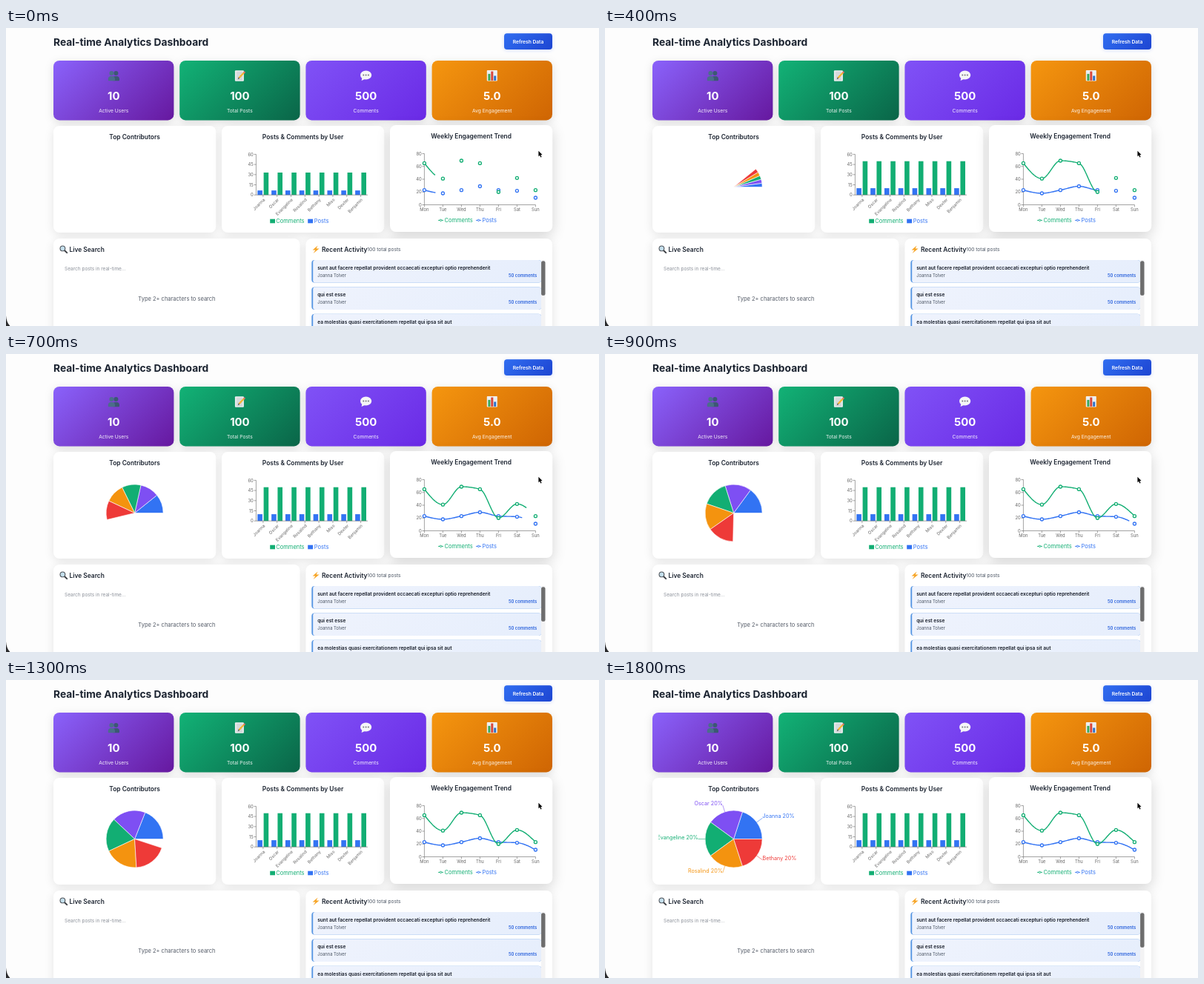
Write an HTML page with a canvas that moves like this. It is 800 by 402 pixels and loops after 2 s.

```html
<!DOCTYPE html>
<html lang="en">
<head>
<meta charset="utf-8">
<title>Analytics Dashboard</title>
<style>
  html, body { margin: 0; width: 100%; height: 100%; overflow: hidden; background: #fdfdfd; }
  canvas { display: block; width: 800px; height: 402px; }
</style>
</head>
<body>
<canvas id="stage" width="800" height="402"></canvas>
<script>
const ctx = document.getElementById('stage').getContext('2d');
const LOOP = 2000, STEP = 100, LAST = 1800;
const BLUE = '#3273f3', PURPLE = '#7e4ff3', GREEN = '#12ae73', ORANGE = '#f4930f', RED = '#ee3a38';
const INK = '#1c2431', AXIS = '#666';
const PEOPLE = ['Joanna', 'Oscar', 'Evangeline', 'Rosalind', 'Bethany', 'Miss', 'Dexter', 'Benjamin'];
const AUTHOR = 'Joanna Tolver';
const DAYS = ['Mon', 'Tue', 'Wed', 'Thu', 'Fri', 'Sat', 'Sun'];
const POSTS = [23, 18, 23, 29, 23, 22, 11];
const COMMENTS = [65, 41, 69, 65, 20, 42, 23];

// CSS "ease" curve
function ease(x) {
  if (x <= 0) return 0;
  if (x >= 1) return 1;
  const bezier = (s, a, b) => 3 * (1 - s) * (1 - s) * s * a + 3 * (1 - s) * s * s * b + s ** 3;
  let low = 0, high = 1;
  for (let i = 0; i < 24; i++) {
    const mid = (low + high) / 2;
    if (bezier(mid, .25, .25) < x) low = mid; else high = mid;
  }
  return bezier(low, .1, 1);
}

// y is the middle of the capital letters
function text(str, x, y, size, color, { weight = 400, align = 'left' } = {}) {
  ctx.font = `${weight} ${size}px Inter, sans-serif`;
  ctx.textAlign = align;
  ctx.fillStyle = color;
  ctx.fillText(str, x, y + size * .364);
}

function box(x, y, w, h, r, fill, shadow) {
  ctx.save();
  if (shadow) {
    ctx.shadowColor = shadow.color;
    ctx.shadowBlur = shadow.blur;
    ctx.shadowOffsetY = shadow.y;
  }
  ctx.fillStyle = fill;
  ctx.beginPath();
  ctx.roundRect(x, y, w, h, r);
  ctx.fill();
  ctx.restore();
}

function disc(x, y, r, fill) {
  ctx.fillStyle = fill;
  ctx.beginPath();
  ctx.arc(x, y, r, 0, 2 * Math.PI);
  ctx.fill();
}

function poly(points, fill) {
  ctx.fillStyle = fill;
  ctx.beginPath();
  points.forEach(p => ctx.lineTo(...p));
  ctx.closePath();
  ctx.fill();
}

function line(points, color, width) {
  ctx.strokeStyle = color;
  ctx.lineWidth = width;
  ctx.beginPath();
  points.forEach(p => ctx.lineTo(...p));
  ctx.stroke();
}

function diagonal(x, y, w, h, from, to) {
  const cx = x + w / 2, cy = y + h / 2, d = (w + h) / 4;
  const g = ctx.createLinearGradient(cx - d, cy - d, cx + d, cy + d);
  g.addColorStop(0, from);
  g.addColorStop(1, to);
  return g;
}

const icons = {
  people(x, y) {
    for (const [dx, color] of [[3.2, '#3c5874'], [-2.8, '#4b6d8b']]) {
      disc(x + dx, y - 3.2, 3, color);
      box(x + dx - 4.6, y + .6, 9.2, 6.4, [4, 4, 1, 1], color);
    }
  },
  memo(x, y) {
    box(x - 6.5, y - 7, 12, 14.5, 1, '#eceef0');
    for (let i = 0; i < 6; i++) line([[x - 4.8, y - 4.6 + i * 2], [x + 3.8, y - 4.6 + i * 2]], '#a3a8ae', .6);
    line([[x - 1, y + 3], [x + 5.6, y - 4]], '#f3b52f', 2.2);
    line([[x + 5.2, y - 3.6], [x + 6.9, y - 5.4]], '#e0736a', 2.2);
    poly([[x - 2.4, y + 4.6], [x - 1.9, y + 2.2], [x - .1, y + 3.8]], '#4a4a4a');
  },
  bubble(x, y) {
    ctx.fillStyle = '#f5f5f7';
    ctx.beginPath();
    ctx.ellipse(x, y - .8, 7.6, 6.1, 0, 0, 2 * Math.PI);
    ctx.fill();
    poly([[x - 5, y + 2], [x - 1, y + 4.5], [x - 6, y + 6.8]], '#f5f5f7');
    for (const dx of [-3.3, 0, 3.3]) disc(x + dx, y - .8, 1, '#77777c');
  },
  bars(x, y) {
    box(x - 7, y - 7.3, 14, 14.6, .8, '#f1f3f5');
    for (let i = -2; i < 3; i++) line([[x - 7, y + i * 2.5], [x + 7, y + i * 2.5]], '#c9d4dd', .4);
    [[-5.4, 9, '#39a85a'], [-1.5, 12.4, '#d8463b'], [2.4, 6.4, '#2e73c9']].forEach(([dx, h, color]) =>
      box(x + dx, y + 6.6 - h, 3, h, 0, color));
  },
  lens(x, y) {
    ctx.lineCap = 'round';
    line([[x + 1.6, y + 1.6], [x + 4.6, y + 4.5]], '#3d4045', 2);
    ctx.lineCap = 'butt';
    disc(x - 1.2, y - 1.2, 3.9, '#50555b');
    disc(x - 1.2, y - 1.2, 2.8, '#c4dfec');
  },
  bolt(x, y) {
    poly([[x + 2.6, y - 5.2], [x - 4.4, y + .9], [x - .6, y + .9], [x - 3.4, y + 5.4],
      [x + 4.6, y - 1.1], [x + .6, y - 1.1]], '#f7a526');
  }
};

function drawHeader() {
  text('Real-time Analytics Dashboard', 64, 18.5, 13.8, INK, { weight: 700 });
  box(672, 7.3, 65, 21.6, 4, diagonal(672, 7.3, 65, 21.6, '#306df0', '#1d45d2'),
    { color: 'rgba(40,90,230,.22)', blur: 5, y: 1 });
  text('Refresh Data', 704.5, 18.4, 6.7, '#fff', { weight: 600, align: 'center' });
}

function drawStats() {
  const stats = [
    ['10', 'Active Users', 'people', '#8a62fb', '#66189f'],
    ['100', 'Total Posts', 'memo', '#12b276', '#0a6548'],
    ['500', 'Comments', 'bubble', '#8052f6', '#6a2ae6'],
    ['5.0', 'Avg Engagement', 'bars', '#f5960f', '#cf6503']
  ];
  stats.forEach(([value, label, icon, from, to], i) => {
    const x = 64 + i * 170.2, mid = x + 81.2;
    box(x, 44, 162.4, 80.4, 8, diagonal(x, 44, 162.4, 80.4, from, to),
      { color: 'rgba(0,0,0,.13)', blur: 12, y: 3 });
    icons[icon](mid, 64.3);
    text(value, mid, 91.4, 14.9, '#fff', { weight: 700, align: 'center' });
    text(label, mid, 111.5, 6.7, 'rgba(255,255,255,.92)', { align: 'center' });
  });
}

function drawCards() {
  const soft = { color: 'rgba(0,0,0,.1)', blur: 13, y: 3 };
  const lifted = { color: 'rgba(0,0,0,.17)', blur: 18, y: 5 };
  const titles = ['Top Contributors', 'Posts & Comments by User', 'Weekly Engagement Trend'];
  titles.forEach((title, i) => {
    const hover = i === 2, y = hover ? 131 : 132, x = 64 + i * 227;
    box(x, y, 219.3, 144, 8, '#fff', hover ? lifted : soft);
    text(title, x + 109.6, y + 15, 8.4, INK, { weight: 600, align: 'center' });
  });
  box(64, 284, 332.6, 140, 8, '#fff', soft);
  box(404.4, 284, 332.6, 140, 8, '#fff', soft);
}

function pieSlice(cx, cy, r, from, to, color) {
  ctx.beginPath();
  ctx.moveTo(cx, cy);
  ctx.arc(cx, cy, r, -from, -to, true);
  ctx.closePath();
  ctx.fillStyle = color;
  ctx.fill();
  ctx.strokeStyle = '#fff';
  ctx.lineWidth = .6;
  ctx.lineJoin = 'round';
  ctx.stroke();
}

function drawPie(time) {
  const cx = 173.6, cy = 214.5, r = 38.5;
  const colors = [BLUE, PURPLE, GREEN, ORANGE, RED];
  const share = ease((time - 400) / 1500) * 2 * Math.PI / colors.length;
  if (!share) return;
  colors.forEach((color, i) => pieSlice(cx, cy, r, i * share, (i + 1) * share, color));
  if (time < 1900) return;
  ctx.save();
  ctx.beginPath();
  ctx.rect(72, 155, 203, 115);
  ctx.clip();
  colors.forEach((color, i) => {
    const a = (i + .5) * share, cos = Math.cos(a), sin = Math.sin(a), end = r + 9.6;
    const x = cx + end * cos, y = cy - end * sin;
    line([[cx + r * cos, cy - r * sin], [x, y]], color, .6);
    text(`${PEOPLE[i]} 20%`, x, y - 2.6, 7.2, color, { align: cos > 0 ? 'left' : 'right' });
  });
  ctx.restore();
}

function drawAxes(x, top, bottom, right, step) {
  line([[x, top], [x, bottom], [right, bottom]], AXIS, .6);
  for (let i = 0; i < 5; i++) {
    const y = bottom - (bottom - top) * i / 4;
    line([[x - 2.9, y], [x, y]], AXIS, .6);
    text(String(i * step), x - 3.7, y, 5.8, AXIS, { align: 'right' });
  }
}

function drawBars(time) {
  const left = 337.4, base = 225.2, band = 18.83, unit = .91;
  const grow = ease(time / 400);
  PEOPLE.forEach((name, i) => {
    const x = left + i * band, mid = x + band / 2;
    box(x + 1.9, base - 10 * unit * grow, 6.6, 10 * unit * grow, 0, BLUE);
    box(x + 10.2, base - 50 * unit * grow, 6.6, 50 * unit * grow, 0, GREEN);
    line([[mid, base], [mid, base + 2.9]], AXIS, .6);
    ctx.save();
    ctx.translate(mid, base + 4);
    ctx.rotate(-Math.PI / 4);
    text(name, 0, 2, 5.8, AXIS, { align: 'right' });
    ctx.restore();
  });
  drawAxes(left, 170.4, base, left + 8 * band, 15);
  box(356.2, 257.7, 6.8, 5.6, 0, GREEN);
  text('Comments', 364.3, 260.2, 7.5, GREEN);
  box(407.2, 257.7, 6.8, 5.6, 0, BLUE);
  text('Posts', 415.8, 260.2, 7.5, BLUE);
}

// Monotone cubic through evenly spaced points, as a fine polyline
function smooth(points) {
  const h = points[1][0] - points[0][0], n = points.length - 1;
  const slope = points.slice(1).map((p, i) => (p[1] - points[i][1]) / h);
  const tangent = points.map((_, i) => {
    if (i === 0 || i === n) return 0;
    const a = slope[i - 1], b = slope[i];
    return (Math.sign(a) + Math.sign(b)) * Math.min(Math.abs(a), Math.abs(b), Math.abs(a + b) / 4);
  });
  tangent[0] = (3 * slope[0] - tangent[1]) / 2;
  tangent[n] = (3 * slope[n - 1] - tangent[n - 1]) / 2;
  const path = [points[0]];
  for (let i = 0; i < n; i++) {
    for (let k = 1; k <= 24; k++) {
      const u = k / 24, v = 1 - u;
      path.push([points[i][0] + u * h,
        points[i][1] * v * v * (1 + 2 * u) + points[i + 1][1] * u * u * (3 - 2 * u)
        + h * u * v * (v * tangent[i] - u * tangent[i + 1])]);
    }
  }
  return path;
}

function drawSeries(values, color, part) {
  const points = values.map((v, i) => [564.4 + i * 25, 238.5 - v * .8625]);
  const path = smooth(points);
  const gap = i => Math.hypot(path[i][0] - path[i - 1][0], path[i][1] - path[i - 1][1]);
  let total = 0;
  for (let i = 1; i < path.length; i++) total += gap(i);
  ctx.save();
  ctx.setLineDash([total * Math.min(1, part) + (part >= 1 ? 1 : 0), total]);
  line(path, color, 1.4);
  ctx.restore();
  points.forEach(p => ring(...p, 2, color, 1.3));
}

function ring(x, y, r, color, width) {
  disc(x, y, r, '#fff');
  ctx.strokeStyle = color;
  ctx.lineWidth = width;
  ctx.stroke();
}

function drawTrend(time) {
  drawAxes(564.4, 169.5, 238.5, 714.4, 20);
  DAYS.forEach((day, i) => {
    const x = 564.4 + i * 25;
    line([[x, 238.5], [x, 241.4]], AXIS, .6);
    text(day, x, 244.7, 5.8, AXIS, { align: 'center' });
  });
  const part = ease(time / 1500);
  drawSeries(POSTS, BLUE, part);
  drawSeries(COMMENTS, GREEN, part * 1.055);
  [['Comments', 583, GREEN], ['Posts', 634, BLUE]].forEach(([label, x, color]) => {
    line([[x, 259.4], [x + 7, 259.4]], color, .9);
    ring(x + 3.5, 259.4, 1.2, color, .9);
    text(label, x + 8.4, 259.2, 7.5, color);
  });
}

function drawSearch() {
  icons.lens(77.6, 298.6);
  text('Live Search', 85.6, 298.6, 8.4, INK, { weight: 600 });
  text('Search posts in real-time...', 79, 324.6, 6.5, '#8b9099');
  text('Type 2+ characters to search', 230.4, 365.2, 7.5, '#555c68', { align: 'center' });
}

function drawActivity() {
  icons.bolt(418, 298.6);
  text('Recent Activity', 426, 298.6, 8.4, INK, { weight: 600 });
  text('100 total posts', 487.3, 298.6, 6.6, '#4b5563');
  const posts = [
    'sunt aut facere repellat provident occaecati excepturi optio reprehenderit',
    'qui est esse',
    'ea molestias quasi exercitationem repellat qui ipsa sit aut'
  ];
  posts.forEach((title, i) => {
    const y = 313 + i * 36.4;
    box(412.3, y, 309.9, 30.6, 4, '#5896e3');
    box(414.2, y, 308, 30.6, [3, 4, 4, 3], diagonal(414, y, 308, 30.6, '#eff3fd', '#e6eefc'));
    text(title, 420.2, y + 10.4, 6.6, '#141a25', { weight: 600 });
    text(AUTHOR, 420.2, y + 20.8, 5.8, '#4b5563');
    text('50 comments', 716.3, y + 20.8, 5.8, '#2a62dc', { weight: 600, align: 'right' });
  });
  box(722, 313, 5.6, 100, 0, '#f3f3f4');
  box(722.1, 314.2, 5.4, 46.6, 2.6, '#6d6d6d');
}

function drawCursor() {
  const x = 718.4, y = 165.8;
  const shape = [[0, 0], [0, 7.4], [1.7, 5.9], [2.9, 8.7], [4.2, 8.1], [3, 5.4], [5.1, 5.2]]
    .map(([dx, dy]) => [x + dx, y + dy]);
  line([...shape, shape[0]], '#fff', 1.2);
  poly(shape, '#050505');
}

// Rounded lower corner of the window
function drawCorner() {
  ctx.fillStyle = '#2b2b2d';
  ctx.beginPath();
  ctx.moveTo(0, 388);
  ctx.quadraticCurveTo(.6, 397.5, 5.5, 402);
  ctx.lineTo(0, 402);
  ctx.fill();
}

function render(t) {
  const time = 155 + 1.02 * t;
  ctx.fillStyle = '#fdfdfd';
  ctx.fillRect(0, 0, 800, 402);
  drawHeader();
  drawStats();
  drawCards();
  drawPie(time);
  drawBars(time);
  drawTrend(time);
  drawSearch();
  drawActivity();
  drawCursor();
  drawCorner();
}

const start = performance.now();
let shown = -1;
function tick() {
  const elapsed = (performance.now() - start) % LOOP;
  const t = Math.min(LAST, Math.floor(elapsed / STEP) * STEP);
  if (t !== shown) render(shown = t);
  requestAnimationFrame(tick);
}
tick();
</script>
</body>
</html>
```
